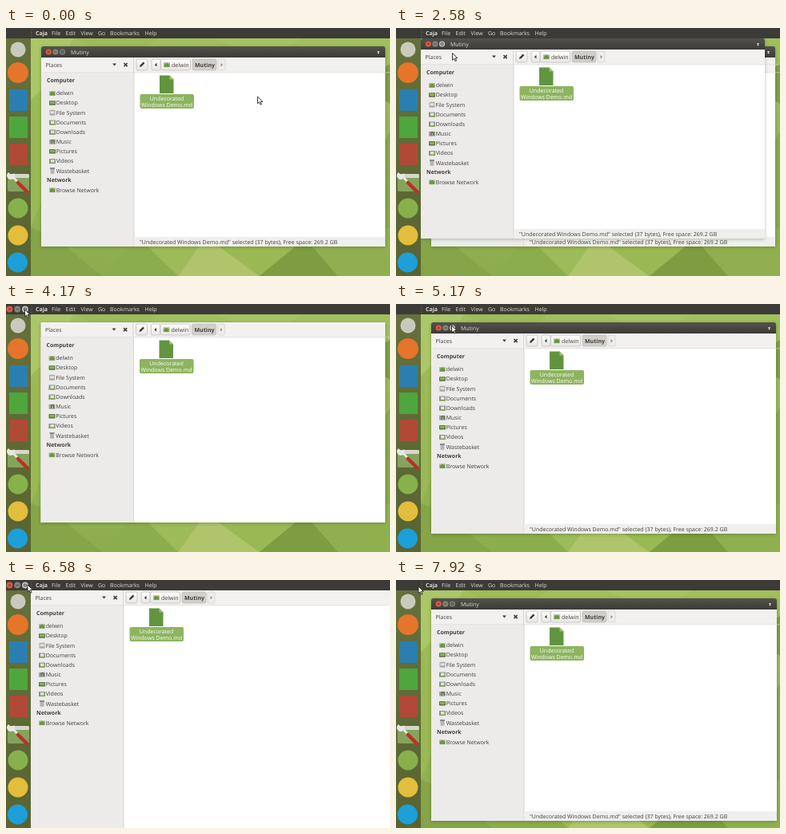
Recreate the animation shown at these times as an HTML page. Size 480 px wide and 311 px high, loop 8 s.

```html
<!DOCTYPE html>
<html lang="en">
<head>
<meta charset="utf-8">
<title>Undecorated windows</title>
<style>
html, body { margin: 0; width: 100%; height: 100%; overflow: hidden; background: #3c3b37; }
svg { display: block; width: 480px; height: 311px; }
svg svg { width: auto; height: auto; }
text { font: 7px "Open Sans", "Noto Sans", sans-serif; fill: #403f3d; text-rendering: geometricPrecision; white-space: pre; }
.b { font-weight: 700; }
.light { fill: #dfdbd2; }
.mid { text-anchor: middle; fill: #fff; }
.shadow { filter: blur(2px); }
.scene { display: none; }
.scene.on { display: inline; }
.hot .third { fill: #c4c2bb; }
</style>
</head>
<body>
<svg id="stage" viewBox="0 0 480 311">
  <defs>
    <linearGradient id="sky" x2="0" y2="1">
      <stop offset="0" stop-color="#a3c05d"/><stop offset="1" stop-color="#8dad4d"/>
    </linearGradient>
    <linearGradient id="bar" x2="0" y2="1">
      <stop offset="0" stop-color="#54524c"/><stop offset="1" stop-color="#3c3b37"/>
    </linearGradient>
    <linearGradient id="dock" x2="0" y2="1">
      <stop offset="0" stop-color="#65703c"/><stop offset="1" stop-color="#586431"/>
    </linearGradient>
    <linearGradient id="btn" x2="0" y2="1">
      <stop offset="0" stop-color="#fdfdfc"/><stop offset="1" stop-color="#e9e7e4"/>
    </linearGradient>
    <g id="toolbar"></g>
    <g id="side"></g>
    <g id="file">
      <path d="M148 22.500h12.500l5 5v17.500h-17.500z" fill="#629440"/>
      <path d="M160.500 22.500v5h5z" fill="#9dc077"/>
      <rect x="123.500" y="46" width="67.500" height="18" rx="2" fill="#8db45f"/>
      <text class="mid" x="157" y="53.600">Undecorated</text>
      <text class="mid" x="157" y="62">Windows Demo.md</text>
    </g>
  </defs>
  <g id="wall"></g>
  <g id="scenes"></g>
  <g id="launcher"></g>
  <g id="panel"></g>
  <path id="cursor" d="M0 0v8.800l2.100-1.900 1.500 3.300 1.500-.7-1.500-3.200h2.800z" fill="#f6f6f6" stroke="#262626" stroke-width=".9"/>
</svg>
<script>
const $ = id => document.getElementById(id);
const rect = (x, y, w, h, fill, extra = '') =>
  `<rect x="${x}" y="${y}" width="${w}" height="${h}" fill="${fill}" ${extra}/>`;
const circle = (x, y, r, fill, extra = '') => `<circle cx="${x}" cy="${y}" r="${r}" fill="${fill}" ${extra}/>`;
const text = (x, y, s, cls = '') => `<text x="${x}" y="${y}" class="${cls}">${s}</text>`;
const path = (d, fill, extra = '') => `<path d="${d}" fill="${fill}" ${extra}/>`;
const button = (x, y, w, h, fill = 'url(#btn)', extra = '') =>
  rect(x, y, w, h, fill, `rx="2" stroke="#bdbab5" stroke-width=".7" ${extra}`);

// Wallpaper facets
$('wall').innerHTML = rect(0, 0, 480, 311, 'url(#sky)') + [
  ['31,13 84,13 62,60 31,90', '#abc768'],
  ['84,13 190,13 150,40', '#9dbb57'],
  ['260,13 370,13 330,40', '#a6c362'],
  ['480,45 480,95 440,70', '#7f9f43'],
  ['480,130 480,260 440,200', '#88a94a'],
  ['31,90 60,180 31,250', '#9ab955'],
  ['31,250 60,262 120,311 31,311', '#85a548'],
  ['120,311 165,262 215,311', '#8cad4b'],
  ['165,262 250,262 215,311', '#9dbb58'],
  ['250,262 317,311 215,311', '#afc46b'],
  ['250,262 376,262 317,311', '#9ab853'],
  ['317,311 374,264 415,311', '#7d9d40'],
  ['415,311 374,264 480,250 480,311', '#90b04f']
].map(([points, fill]) => `<polygon points="${points}" fill="${fill}"/>`).join('');

// Places icon, 8px wide
const placeIcon = (x, y, kind) => ({
  home: rect(x, y, 8, 6, '#b0b5a5', 'rx=".6"') + path(`M${x + 1} ${y + 5.500}v-3l3-2 3 2v3z`, '#679a36'),
  desk: rect(x, y, 8, 5.500, '#5d7348', 'rx=".6"') + rect(x + 1, y + 1, 6, 3, '#86b355'),
  disk: rect(x + .5, y - .5, 7, 7, '#a9a9a6', 'rx=".8"') + rect(x + 1.500, y + 1, 5, 3, '#e3e3e1'),
  folder: rect(x, y, 8, 6, '#8b9183', 'rx=".6"') + rect(x + 2, y + 1, 4.500, 4, '#dfe5d4') + rect(x, y + 4.500, 8, 1.500, '#78a24b'),
  note: rect(x, y, 8, 6, '#a0a69a', 'rx=".6"') + path(`M${x + 3} ${y + 5}v-4h3v4`, 'none', 'stroke="#4a5b39"'),
  bin: rect(x + 1.500, y - .5, 5, 7, '#b4b4b1', 'rx=".7"') + rect(x + 1, y - 1, 6, 1.500, '#777')
})[kind];

// Toolbar and sidebar are drawn from the window's inner corner
$('toolbar').innerHTML =
  button(2, 2, 96, 14, 'url(#btn)', 'id="combo"') + text(5.500, 11.500, 'Places') +
  path('M89 7.600h5l-2.500 3z', '#403f3d') +
  path('M103.500 7l4.200 4.200m0-4.200l-4.200 4.200', 'none', 'stroke="#403f3d" stroke-width="1.700"') +
  rect(115, 0, .8, 19, '#d3d0cc') +
  button(119, 2, 14, 14) + path('M123 12l.7-2.400 4-4 1.700 1.700-4 4z', '#3b3a38') +
  button(138, 2, 11, 14) + path('M144.500 6.800v4.800l-2.700-2.400z', '#403f3d') +
  button(149.500, 2, 37, 14) + placeIcon(153, 6.300, 'home') + text(163, 11.500, 'delwin') +
  button(189, 2, 30, 14, '#d2cfcb') + text(192, 11.500, 'Mutiny', 'b') +
  button(221, 2, 9, 14, '#efedeb', 'stroke-opacity=".6"') + path('M224.500 7v4.400l2.500-2.200z', '#8e8c88') +
  rect(0, 18.500, 640, .6, '#dad7d3');

const places = [['delwin', 'home'], ['Desktop', 'desk'], ['File System', 'disk'], ['Documents', 'folder'],
  ['Downloads', 'folder'], ['Music', 'note'], ['Pictures', 'desk'], ['Videos', 'folder'], ['Wastebasket', 'bin']];
const place = ([name, kind], y) => placeIcon(10, y - 5.300, kind) + text(18.700, y, name);
$('side').innerHTML = text(7, 31, 'Computer', 'b') +
  places.map((p, i) => place(p, 47.300 + i * 12.150)).join('') +
  text(7, 156.400, 'Network', 'b') + place(['Browse Network', 'home'], 168.500);

const controls = (x, y, gap, r) => circle(x, y, r, '#df5a3c') +
  circle(x + gap, y, r, '#85837c') + circle(x + 2 * gap, y, r, '#85837c', 'class="third"') +
  path(`M${x - 1.300} ${y - 1.300}l2.600 2.600m0-2.600l-2.600 2.600M${x + gap - 1.500} ${y}h3` +
    `M${x + 2 * gap - 1.400} ${y - 1.300}h2.800v2.600h-2.800z`, 'none', 'stroke="#3c3b37" stroke-width=".8"');

const status = '"Undecorated Windows Demo.md" selected (37 bytes), Free space: 269.2 GB';

function win(x, y, right, bottom, framed = true) {
  const w = right - x, top = framed ? y + 14 : y, h = bottom - top;
  const title = path(`M${x} ${top}v-11q0-3 3-3h${w - 6}q3 0 3 3v11z`, 'url(#bar)') +
    controls(x + 9.300, y + 7, 8.600, 3.600) + text(x + 37, y + 9.600, 'Mutiny', 'light') +
    path(`M${right - 10} ${y + 6}h3l-.8 1.200v2h-1.400v-2z`, '#e4e2dc');
  const foot = rect(x + 116, bottom - 12, w - 116, 12, '#f0efed') + text(x + 123, bottom - 3.500, status);
  return rect(x, y + 1, w, bottom - y, '#20300a', 'opacity=".3" class="shadow"') +
    (framed ? title : '') +
    rect(x, top, w, h, '#f2f1f0') +
    rect(x, top + 19, 115.500, h - 19, '#ecebea') +
    rect(x + 116.500, top + 19, w - 116.500, h - 19, '#fff') +
    rect(x + 115.500, top + 19, .8, h - 19, '#d0ceca') +
    `<svg x="${x}" y="${top}" style="width:${w}px;height:${h}px">` +
    ['toolbar', 'side', 'file'].map(id => `<use href="#${id}"/>`).join('') + '</svg>' +
    (framed ? foot : '');
}

// [first frame, markup, inner corner x and y under the pointer, maximised controls shown]
const full = win(31, 13, 482, 313, false);
const first = win(44, 23, 474, 274), second = win(44, 23, 475, 288);
const scenes = [
  [0, first, 44, 37, false],
  [31, first + win(31, 13, 461, 264), 44, 37, false],
  [32, full, 31, 13, true],
  [50, win(43.500, 23, 474, 274, false), 43.500, 23, true],
  [51, second, 44, 37, false],
  [63, second + win(31, 13, 462, 278), 44, 37, false],
  [64, full, 31, 13, true],
  [88, win(43.500, 23, 475, 288, false), 43.500, 23, true],
  [89, win(44, 23, 476, 302), 44, 37, false]
];
$('scenes').innerHTML = scenes.map(s => `<g class="scene">${s[1]}</g>`).join('');
const layers = [...$('scenes').children];

$('launcher').innerHTML = rect(0, 13, 31, 298, 'url(#dock)') +
  circle(15, 27, 9.500, '#c9cabd') +
  circle(15, 56, 13, '#e5752a') +
  rect(4, 77, 23, 27, '#2b7fb0') +
  rect(4, 111, 23, 27, '#4fa63c') +
  rect(4, 145, 23, 27, '#b04a36') +
  rect(2, 183, 27, 22, '#85a35c', 'rx="2"') + rect(2, 183, 27, 5, '#d4d8c9', 'rx="1.500"') +
  path('M7 185l18 19', 'none', 'stroke="#e6e6e3" stroke-width="3" stroke-linecap="round"') +
  path('M15 194l11 11', 'none', 'stroke="#bd2f2a" stroke-width="4.500" stroke-linecap="round"') +
  path('M3 181a5 5 0 1 0 7 1l-3 3z', '#e6e6e3') +
  circle(15, 226, 12.500, '#86b14b') +
  circle(15, 260, 12.500, '#e3bd3c') +
  circle(14.500, 294, 12.500, '#1d9fd9');

const menu = [[57, 'File'], [74.500, 'Edit'], [93.500, 'View'], [115, 'Go'], [130, 'Bookmarks'], [173.500, 'Help']];
$('panel').innerHTML = rect(0, 0, 480, 13, '#3c3b37') +
  [2.500, 5, 7.500, 10].map(y => rect(31.500, y, 1, 1, '#77756e')).join('') +
  text(37, 9.200, 'Caja', 'b light') + menu.map(([x, s]) => text(x, 9.200, s, 'light')).join('') +
  `<g id="controls">${controls(4.500, 6.500, 9.700, 3.900)}</g>`;

// Pointer stops: [frame, x, y]
const stops = [[0, 314.500, 86], [1, 314.500, 86], [15, 84.500, 46.500], [17, 84.500, 46.500], [25, 70.500, 31.500],
  [33, 70.500, 31.500], [46, 23.500, 7], [51, 23.500, 7], [60, 69.500, 27], [65, 69.500, 27], [76, 27, 6],
  [81, 27, 6], [84, 28, 8], [96, 28, 8]];

function pointer(f) {
  const i = stops.findIndex((s, n) => f < stops[n + 1][0]);
  const [f0, x0, y0] = stops[i], [f1, x1, y1] = stops[i + 1];
  const p = (f - f0) / (f1 - f0), e = p * p * (3 - 2 * p);
  return [x0 + (x1 - x0) * e, y0 + (y1 - y0) * e];
}

const LOOP = 8000, FPS = 12;
const start = performance.now();

function draw() {
  const ms = (performance.now() - start) % LOOP;
  const f = Math.min(95, Math.floor((ms + 4) * FPS / 1000));
  const [x, y] = pointer(f);
  const now = scenes.findLastIndex(s => s[0] <= f);
  const [, , left, top, maximised] = scenes[now];
  layers.forEach((g, i) => g.classList.toggle('on', i === now));
  $('controls').style.display = maximised ? '' : 'none';

  const overCombo = x > left + 2 && x < left + 98 && y > top + 2 && y < top + 16;
  $('combo').style.opacity = overCombo && !maximised ? 1 : 0;
  const [cx, cy] = maximised ? [24, 6.500] : [left + 26.500, top - 7];
  $('stage').classList.toggle('hot', Math.hypot(x - cx, y - cy) < 4.500);

  $('cursor').setAttribute('transform', `translate(${x.toFixed(2)} ${y.toFixed(2)})`);
  requestAnimationFrame(draw);
}
draw();
</script>
</body>
</html>
```
